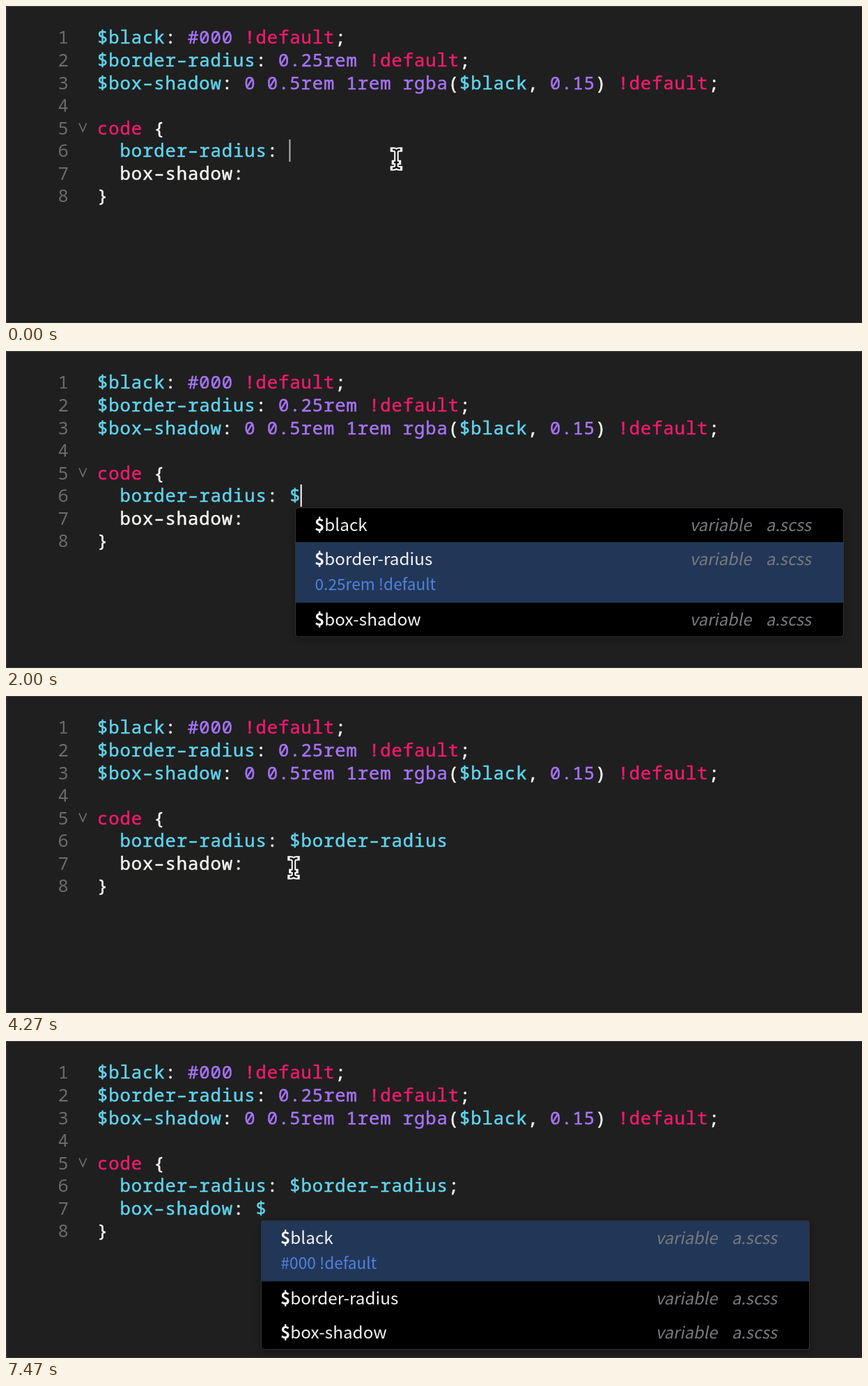
Recreate the animation shown at these times as an HTML page with a canvas. Size 1229 by 456 pixels, loop 8 s.

```html
<!DOCTYPE html>
<html lang="en">
<head>
<meta charset="utf-8">
<title>SCSS variable completion</title>
<style>
html, body { margin: 0; width: 100%; height: 100%; overflow: hidden; background: #1f1f1f; }
canvas { display: block; }
</style>
</head>
<body>
<canvas id="stage" width="1229" height="456"></canvas>
<script>
const ctx = document.getElementById('stage').getContext('2d');
const WIDTH = 1229, HEIGHT = 456, LOOP = 8000;
const CELL = 16.25, LINE = 32.57, LEFT = 130.6, BASE = 54.4;
const CYAN = '#60d4ee', PINK = '#f01b6c', PURPLE = '#a674f8', WHITE = '#f8f8f4', GRAY = '#6c6c6c';
const CODE_FONT = '25.6px "Noto Sans Mono", "DejaVu Sans Mono", monospace';
const UI = '"Noto Sans CJK JP", "Noto Sans CJK SC", "Open Sans", sans-serif';

const VARIABLES = [
  ['$black', '#000 !default'],
  ['$border-radius', '0.25rem !default'],
  ['$box-shadow', '0 0.5rem 1rem rgba($black, 0.15) !default']
];
const HEADER = [...VARIABLES.map(([name, value]) => `${name}: ${value};`), '', 'code {'];
const TOKEN = /(^\s+[\w-]+(?=:)|\$[\w-]*)|(!default|^code)|(#\d+|[\d.]+(?:rem)?|rgba)|[^\s\w$!#]+/g;

const clamp = x => Math.min(1, Math.max(0, x));

// A hairline stroke gives the code its slightly heavier weight.
function drawCells(text, column, row, color) {
  ctx.font = CODE_FONT;
  ctx.textAlign = 'center';
  ctx.fillStyle = ctx.strokeStyle = color;
  ctx.lineWidth = 0.5;
  [...text].forEach((char, i) => {
    const glyph = char === '-' ? '–' : char; // wide hyphen
    const x = LEFT + (column + i + 0.5) * CELL, y = BASE + row * LINE;
    ctx.fillText(glyph, x, y);
    ctx.strokeText(glyph, x, y);
  });
}

function drawCode(text, row) {
  for (const m of text.matchAll(TOKEN)) {
    const color = m[1] ? CYAN : m[2] ? PINK : m[3] ? PURPLE : WHITE;
    drawCells(m[0], m.index, row, color);
  }
}

function drawGutter() {
  ctx.font = CODE_FONT;
  ctx.textAlign = 'center';
  ctx.fillStyle = GRAY;
  for (let row = 0; row < 8; row++) ctx.fillText(row + 1, 82.3, BASE + row * LINE);
  ctx.strokeStyle = '#777';
  ctx.lineWidth = 1.5;
  ctx.beginPath();
  ctx.moveTo(105, 168.5);
  ctx.lineTo(110.3, 180.5);
  ctx.lineTo(115.6, 168.5);
  ctx.stroke();
}

function drawCaret(column, row, alpha) {
  ctx.globalAlpha = alpha;
  ctx.fillStyle = '#fff';
  ctx.fillRect(LEFT + column * CELL - 0.4, 192 + (row - 5) * LINE, 2, 32);
  ctx.globalAlpha = 1;
}

// Opacity of a blink that began `age` ms ago: out, dark, in.
const blink = age => age < 270 ? 1 - clamp(age / 150) : clamp((age - 270) / 130);

function caretAlpha(t) {
  if (t < 730) return blink(t + 50);
  if (t < 3470) {
    if (t < 1330) return 1;
    if (t < 2130) return t < 1700 ? 1 - clamp((t - 1330) / 200) : clamp((t - 1700) / 200);
    return blink((t - 2130) % 800);
  }
  if (t < 5470) return t < 4000 ? 1 : blink((t - 4000) % 800);
  if (t < 6930) return t < 6600 ? 1 - clamp((t - 6180) / 150) : 1;
  return 1 - clamp((t - 7250) / 150);
}

function drawUi(text, x, y, size, color, weight = 400) {
  ctx.font = `${weight} ${size}px ${UI}`;
  ctx.textAlign = 'left';
  ctx.fillStyle = color;
  ctx.fillText(text, x, y);
  return ctx.measureText(text).width;
}

function drawSlanted(text, x, y) {
  ctx.save();
  ctx.translate(x, y);
  ctx.transform(1, 0, -0.2, 1, 0, 0);
  drawUi(text, 0, 0, 23.6, '#777a7e');
  ctx.restore();
}

function drawPopup(x, y, selected, alpha) {
  ctx.save();
  ctx.globalAlpha = alpha;
  ctx.translate(x, y);
  ctx.beginPath();
  ctx.roundRect(0.5, 0.5, 787, 185.5, 4);
  ctx.shadowColor = 'rgba(0,0,0,.35)';
  ctx.shadowBlur = 10;
  ctx.shadowOffsetY = 3;
  ctx.fillStyle = '#000';
  ctx.fill();
  ctx.shadowColor = 'transparent';
  ctx.save();
  ctx.clip();
  let top = 1;
  VARIABLES.forEach(([name, value], i) => {
    const active = i === selected;
    if (active) {
      ctx.fillStyle = '#223757';
      ctx.fillRect(0, top - (i ? 0 : 1), 788, i ? 87 : 88);
      drawUi(value, 28.5, top + 69, 22.7, '#5182e0');
    }
    const width = drawUi('$', 28, top + 33, 24.3, '#f4f4f4', 700);
    drawUi(name.slice(1), 28 + width, top + 33, 24.3, '#f4f4f4');
    drawSlanted('variable', 567, top + 33);
    drawSlanted('a.scss', 676, top + 33);
    top += active ? 87 : 49;
  });
  ctx.restore();
  ctx.strokeStyle = '#343434';
  ctx.lineWidth = 1;
  ctx.stroke();
  ctx.restore();
}

function drawPointer(x, y) {
  ctx.save();
  ctx.translate(x, y);
  const beam = new Path2D('M-5.5-13.5H-4Q0-13.5 0-9.5Q0-13.5 4-13.5H5.5M0-9.5V9.5M-5.5 13.5H-4Q0 13.5 0 9.5Q0 13.5 4 13.5H5.5M-3.5 5H3.5');
  for (const [color, width] of [['#fff', 6.5], ['#111', 2.4]]) {
    ctx.strokeStyle = color;
    ctx.lineWidth = width;
    ctx.lineCap = color === '#fff' ? 'square' : 'butt';
    ctx.stroke(beam);
  }
  ctx.restore();
}

function drawWindow() {
  ctx.fillStyle = '#1f1f1f';
  ctx.fillRect(0, 0, WIDTH, HEIGHT);
  ctx.fillStyle = '#414143';
  ctx.fillRect(0, 0, WIDTH, 1);
  ctx.fillStyle = '#343436';
  ctx.fillRect(0, 0, 1.5, HEIGHT);
  ctx.fillRect(0, HEIGHT - 1, WIDTH, 1);
}

function draw(t) {
  const appear = start => 1 - (1 - clamp((t - start) / 200)) ** 3;
  const radius = t < 730 ? '' : t < 3470 ? '$' : t < 5470 ? '$border-radius' : '$border-radius;';
  const shadow = t < 6930 ? '' : '$';
  const radiusLine = `  border-radius: ${radius}`;
  const shadowLine = `  box-shadow: ${shadow}`;

  drawWindow();
  drawGutter();
  HEADER.forEach(drawCode);
  drawCode(radiusLine, 5);
  drawCode('}', 7);
  if (t < 5670) {
    drawCells(shadowLine, 0, 6, WHITE);
    drawCaret(radiusLine.length, 5, caretAlpha(t));
  } else {
    drawCode(shadowLine, 6);
    drawCaret(shadowLine.length, 6, caretAlpha(t));
  }

  if (t >= 760 && t < 3530) {
    drawPopup(415, 225, t < 1800 ? 0 : 1, t < 3470 ? appear(760) : 0.5);
  }
  if (t >= 6960) drawPopup(366, 257.7, 0, appear(6960));

  if (t < 730) drawPointer(560.5, 220);
  if (t >= 4070 && t < 5130) drawPointer(413, 247);
}

const start = performance.now();
function tick() {
  draw((performance.now() - start) % LOOP);
  requestAnimationFrame(tick);
}
tick();
</script>
</body>
</html>
```
